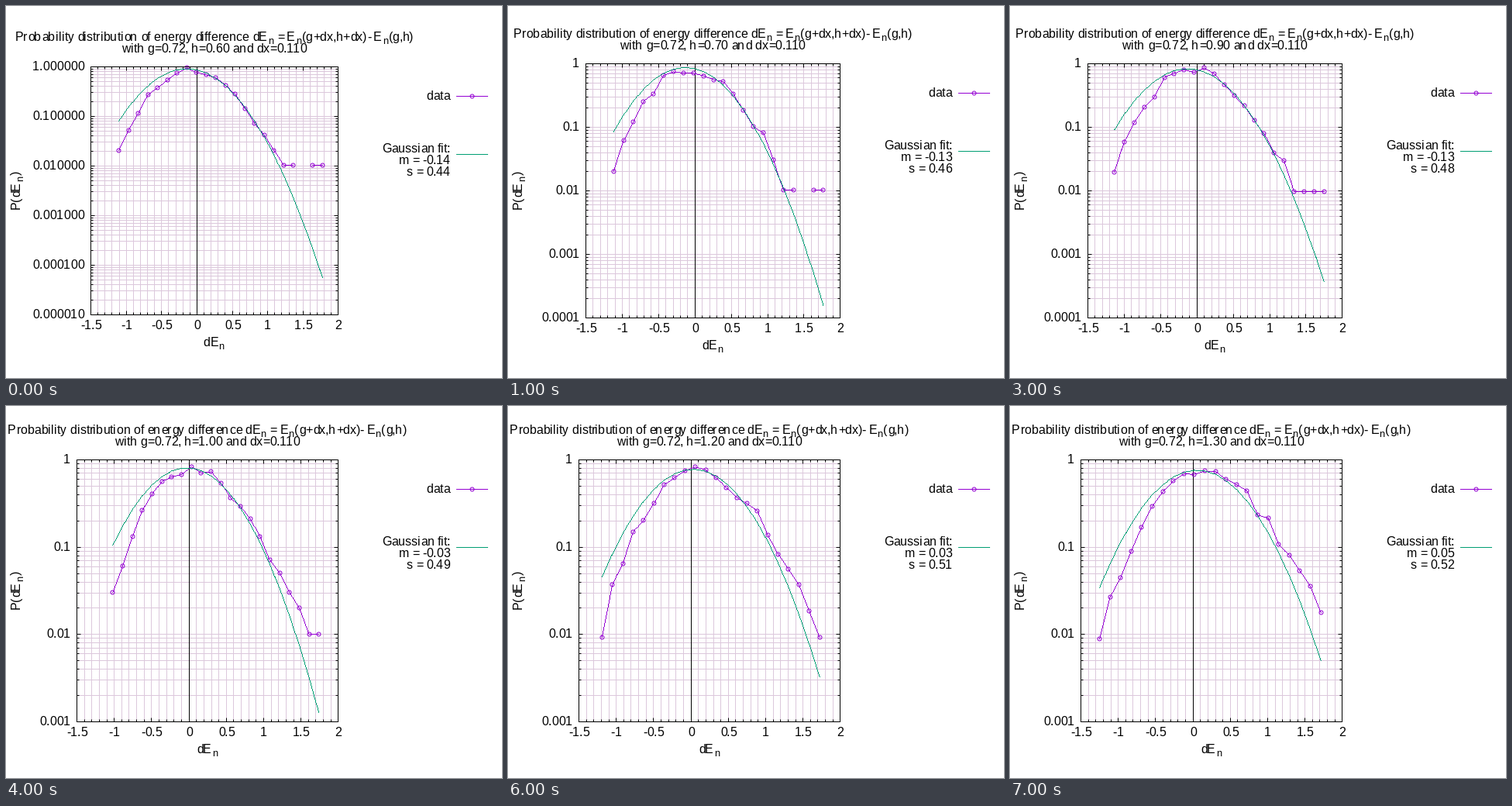
Write a matplotlib script that moves like this. It is 640x480 px and loops after 8000 ms.

```python
import math
import numpy as np
import matplotlib.pyplot as plt
from matplotlib.animation import FuncAnimation
from matplotlib.collections import LineCollection
from matplotlib.textpath import TextPath

plt.rcParams.update({
    "font.family": "Liberation Sans",
    "text.hinting": "native",
    "axes.unicode_minus": False,
})

W, H, DPI = 640, 480, 72   # at 72 dpi a point is a pixel
PURPLE, GREEN, GRID = "#9400d3", "#009e73", "#dcc8dc"
RIGHT = 428
BINS = 22
SIZE, LOW = 16, 0.8        # font size and subscript scale

# mean, width and lowest bin of the distribution for each h
MEAN = [-0.144, -0.133, -0.13, -0.13, -0.026, 0.024, 0.03, 0.054]
WIDTH = [0.4355, 0.457, 0.463, 0.478, 0.491, 0.517, 0.5115, 0.5237]
FIRST = [-1.105, -1.12, -1.13, -1.137, -1.018, -1.06, -1.19, -1.25]

fig = plt.figure(figsize=(W / DPI, H / DPI), dpi=DPI, facecolor="white")
ax = fig.add_axes([0, 0, 1, 1])
steps = {}


def extent(s):
    return TextPath((0, 0), f"|{s}|", size=SIZE).get_extents().width


def step(a, b=""):
    """Advance from glyph a to glyph b, with kerning."""
    if (a, b) not in steps:
        steps[a, b] = extent(a + b) - extent(b)
    return steps[a, b]


def layout(s):
    """Glyphs on whole pixels; an underscore lowers the next one."""
    glyphs, pos, low = [], 0, False
    for c, after in zip(s, s[1:] + "_"):
        if c == "_":
            low = True
            continue
        glyphs.append((c, pos, low))
        if low:
            pos += math.ceil(step(c) * LOW)
        else:
            pos += round(step(c, after.strip("_")))
        low = False
    return glyphs, pos


def text(x, y, s, align=0, turned=False):
    """Align is the part of the width before the anchor."""
    glyphs, width = layout(s)
    for c, pos, low in glyphs:
        along, drop = round(pos - align * width + (y if turned else x)), 4 * low
        if turned:
            along = round(y + align * width - pos)
        px, py = (x + drop, along) if turned else (along, y + drop)
        ax.text(px - 0.5, py - 0.5, c, size=SIZE * (LOW if low else 1),
                color="black", va="baseline", rotation=90 * turned,
                rotation_mode="anchor")


def segments(segs, color):
    ax.add_collection(LineCollection(
        segs, colors=color, linewidths=1, capstyle="butt", snap=False),
        autolim=False)


def trace(x, y, color):
    """Stepped one-pixel line; a missing point breaks it."""
    segs = []
    for x0, y0, x1, y1 in zip(x, y, x[1:], y[1:]):
        if np.isnan(y0 + y1):
            continue
        n = int(max(abs(x1 - x0), abs(y1 - y0))) + 2
        px, py = np.rint(np.linspace((x0, y0), (x1, y1), n)).T
        segs += [[(a - 0.5, b), (a + 0.5, b)] for a, b in zip(px, py)]
    segments(segs, color)


def rings(x, y):
    t = np.linspace(0, 2 * np.pi, 25)
    segments([np.column_stack([a + 2.5 * np.cos(t), b + 2.5 * np.sin(t)])
              for a, b in zip(np.rint(x), np.rint(y)) if not np.isnan(b)],
             PURPLE)


def box(decades):
    top = round(55.5 + 4.5 * decades)
    return 64 + 9 * decades, top, 476 - top


def to_x(v, decades):
    left = box(decades)[0]
    return left + (v + 1.5) / 3.5 * (RIGHT + 0.4 - left)


def to_y(p, decades):
    _, top, bottom = box(decades)
    return top - (bottom - top) / decades * np.log10(p)


def draw_axes(decades):
    left, top, bottom = box(decades)
    xs = [(k, round(to_x(k / 10, decades))) for k in range(-15, 21)]
    ys = [(n, round(to_y(n * 10.0 ** -d, decades)))
          for d in range(1, decades + 1) for n in range(1, 10)]

    segments([[(x, top), (x, bottom)] for _, x in xs]
             + [[(left, y), (RIGHT, y)] for _, y in ys], GRID)

    ticks = []
    for k, x in xs:
        size = 3 if k % 5 else 5
        ticks += [[(x, bottom), (x, bottom - size)], [(x, top), (x, top + size)]]
        if k % 5 == 0:
            text(x + 0.5, bottom + 19, f"{k / 10:g}", 0.5)
        if k == 0:
            ticks.append([(x, top), (x, bottom)])
    for n, y in ys:
        size = 5 if n == 1 else 3
        ticks += [[(left, y), (left + size, y)], [(RIGHT, y), (RIGHT - size, y)]]
    segments(ticks, "black")

    for d in range(decades + 1):
        digits = 6 if decades == 5 else d
        p = 10.0 ** -d
        text(left - 8, round(to_y(p, decades)) + 5, f"{p:.{digits}f}", 1)


def draw_labels(decades, h, m, s):
    left, top, bottom = box(decades)
    mid = (left + RIGHT) / 2
    text(mid, top - 33, "Probability distribution of energy difference "
         "dE_n = E_n(g+dx,h+dx)- E_n(g,h)", 0.5)
    text(mid, top - 18, f"with g=0.72, h={h:.2f} and dx=0.110", 0.5)
    text(mid, bottom + 41, "dE_n", 0.5)
    text(18, 238, "P(dE_n)", 0.5, turned=True)

    key = top + 38
    text(573, key + 5, "data", 1)
    segments([[(580.5, key), (621.5, key)]], PURPLE)
    rings([601], [key])
    key += 75
    segments([[(580.5, key), (621.5, key)]], GREEN)
    for k, s_ in enumerate(["Gaussian fit:", f"m = {m:.2f}", f"s = {s:.2f}"]):
        text(573, key - 2 + 15 * k, s_, 1)


def histogram(i, fit, bin_width):
    """Noisy counts, skewed to the right, with at least one per bin."""
    rng = np.random.default_rng(40 + i)
    unit = 1 / ((700 + 13 * i) * bin_width)
    skew = 1.4 * np.linspace(-1, 1, BINS) ** 3
    p = fit * np.exp(skew + 0.12 * rng.standard_normal(BINS))
    p = unit * np.maximum(1, np.round(np.minimum(p, 0.95) / unit))
    if WIDTH[i] < 0.46:   # a narrow distribution leaves a bin empty
        p[-3] = np.nan
    return p


def draw(i):
    ax.clear()
    ax.axis("off")
    ax.set_xlim(-0.5, W - 0.5)
    ax.set_ylim(H - 0.5, -0.5)

    m, s = MEAN[i], WIDTH[i]
    v = np.linspace(FIRST[i], 1.775 - 0.009 * i, BINS)
    fit = np.exp(-((v - m) / s) ** 2 / 2) / (s * math.sqrt(2 * math.pi))
    decades = math.ceil(-math.log10(fit.min()))
    left, top, bottom = box(decades)

    draw_axes(decades)
    x = to_x(v, decades)
    y = to_y(histogram(i, fit, v[1] - v[0]), decades)
    trace(x, y, PURPLE)
    rings(x, y)
    trace(x, to_y(fit, decades), GREEN)
    trace([left, RIGHT, RIGHT, left, left], [top, top, bottom, bottom, top],
          "black")
    draw_labels(decades, 0.6 + 0.1 * i, m, s)
    return []


anim = FuncAnimation(fig, draw, frames=len(MEAN), interval=1000,
                     init_func=lambda: draw(0), repeat=True, repeat_delay=0)
plt.show()
```
